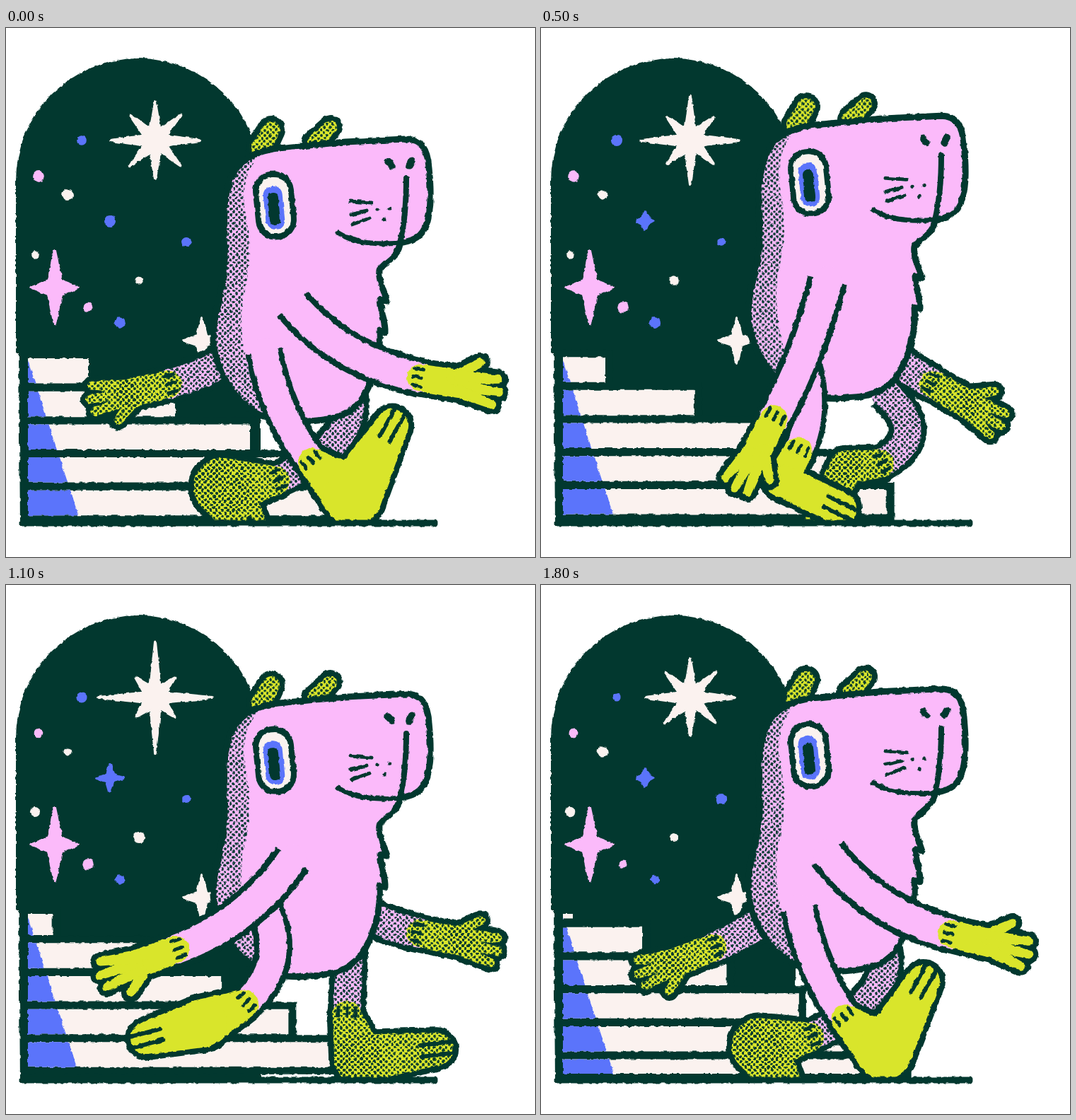
These frames come from a looping animation (748 px wide and 748 px high, 1900 ms). An HTML page with a canvas:

```html
<!DOCTYPE html>
<html lang="en">
<head>
<meta charset="utf-8">
<title>Night walk</title>
<style>
  html, body { margin: 0; width: 100%; height: 100%; overflow: hidden; background: #fff; }
  canvas { display: block; filter: url(#rough); }
  svg { position: absolute; width: 0; height: 0; }
</style>
</head>
<body>
<canvas id="stage" width="748" height="748"></canvas>
<svg><filter id="rough" x="0" y="0" width="100%" height="100%" color-interpolation-filters="sRGB">
  <feTurbulence type="fractalNoise" baseFrequency=".13" numOctaves="2" seed="4"/>
  <feDisplacementMap in="SourceGraphic" scale="4.5" xChannelSelector="R" yChannelSelector="G"/>
</filter></svg>
<script>
const ctx = document.getElementById('stage').getContext('2d');
const DARK = '#02382f', PINK = '#fbbafa', GREEN = '#d9e52b', CREAM = '#fbf2ef', BLUE = '#5b74fb';
const FRAMES = 20, LOOP = 1900, TAU = 2 * Math.PI, DEG = Math.PI / 180;

// Walk settings; the far limbs run half a cycle later and are warped in time
const nearSide = {
  shift: 0, far: false,
  arm: { mean: 92, reach: 62, lead: 0, warp: 0 },
  leg: { hipX: 365, hipY: 457, x: 380, stride: 53, y: 602, drop: 12, lead: 0, warp: 0 }
};
const farSide = {
  shift: FRAMES / 2, far: true,
  arm: { mean: 87, reach: 60, lead: 0, warp: -.5 },
  leg: { hipX: 485, hipY: 515, x: 462, stride: 82, y: 622, drop: -18, lead: .3, warp: .5 }
};
// Key points of one step: frame, knee bend, heel angle, foot pitch
const step = [
  [0, -18, 40, -61], [2, 0, 75, -7], [5, 8, 95, 8], [8, 68, 167, 60], [10, 68, 173, 57],
  [12, 50, 155, 165], [15, 60, 180, 125], [18, 100, 165, 90], [19, -16, 40, -61]
];
const dots = [
  [107, 159, BLUE], [46, 210, PINK], [87, 236, CREAM], [255, 302, BLUE],
  [41, 321, CREAM], [188, 357, CREAM], [116, 395, PINK], [161, 417, BLUE]
];

const arch = new Path2D('M14 216A173 173 0 0 1 360 216V704H20L18 460H14Z');
const body = new Path2D(`M313 225C321 190 345 173 385 168L480 159L565 155C588 155 596 170 598 195
  C601 225 601 245 598 262C593 290 582 298 557 302C556 320 540 325 528 340C526 355 535 370 539 384L529 382
  C530 400 537 415 536 428L528 426C530 455 525 480 512 507C500 535 480 550 440 553C410 557 385 555 358 545
  C322 525 297 485 293 440C292 400 308 370 309 330C309 290 304 260 313 225Z`);
const shade = new Path2D('M378 160C345 182 334 215 337 250C346 300 346 325 338 365C328 410 330 480 376 560H270V160Z');

const tile = document.createElement('canvas');
tile.width = tile.height = 8;
const tileCtx = tile.getContext('2d');
tileCtx.fillStyle = DARK;
for (const p of [2, 6]) { tileCtx.beginPath(); tileCtx.arc(p, p, 1.9, 0, TAU); tileCtx.fill(); }
const halftone = ctx.createPattern(tile, 'repeat');

function swing(frame, lead = 0, warp = 0) {
  const p = frame / FRAMES * TAU + lead;
  return Math.cos(p + warp * Math.sin(p));
}

function keyed(rows, frame) {
  const i = rows.findLastIndex(r => r[0] <= frame);
  const a = rows[i], b = rows[(i + 1) % rows.length];
  const k = (frame - a[0]) / ((b[0] - a[0] + FRAMES) % FRAMES);
  return a.map((v, n) => v + (b[n] - v) * k).slice(1);
}

function circle(x, y, r, color) {
  ctx.fillStyle = color;
  ctx.beginPath();
  ctx.arc(x, y, r, 0, TAU);
  ctx.fill();
}

function line(d, width, color = DARK) {
  ctx.lineWidth = width;
  ctx.strokeStyle = color;
  ctx.stroke(new Path2D(d));
}

function pill(x, y, w, h, r, color, turn = -.1) {
  ctx.save();
  ctx.translate(x, y);
  ctx.rotate(turn);
  ctx.fillStyle = color;
  ctx.beginPath();
  ctx.roundRect(-w / 2, -h / 2, w, h, r);
  ctx.fill();
  ctx.restore();
}

// Spikes of the given lengths, repeated around the centre
function star(x, y, lengths, points, core, color) {
  ctx.beginPath();
  for (let i = 0; i < points * 2; i++) {
    const r = i % 2 ? core : lengths[i / 2 % lengths.length], a = i * Math.PI / points;
    ctx.lineTo(x + r * Math.cos(a), y + r * Math.sin(a));
  }
  ctx.closePath();
  ctx.fillStyle = ctx.strokeStyle = color;
  ctx.lineWidth = 4;
  ctx.fill();
  ctx.stroke();
}

// Tapered capsules, optionally grown for the outline
function blobs(list, grow, color) {
  ctx.fillStyle = color;
  for (const [x1, y1, r1, x2, y2, r2] of list) {
    const a = Math.atan2(y2 - y1, x2 - x1);
    const ratio = (r1 - r2) / (Math.hypot(x2 - x1, y2 - y1) || 1);
    const d = Math.acos(Math.max(-1, Math.min(1, ratio)));
    ctx.beginPath();
    ctx.arc(x1, y1, r1 + grow, a + d, a - d + TAU);
    ctx.arc(x2, y2, r2 + grow, a - d, a + d);
    ctx.fill();
  }
}

function limb([sx, sy, cx, cy, wx, wy], end, width, far) {
  const tube = `M${sx} ${sy}Q${cx} ${cy} ${wx} ${wy}`;
  ctx.lineCap = 'butt';
  line(tube, width + 16);
  blobs(end, 8, DARK);
  ctx.lineCap = 'round';
  line(tube, width, PINK);
  if (far) line(tube, width, halftone);
  blobs(end, 0, GREEN);
  if (far) blobs(end, 0, halftone);
  const a = Math.atan2(wy - cy, wx - cx), ux = Math.cos(a), uy = Math.sin(a);
  for (const o of [-12, 0, 12]) {
    const x = wx - uy * o - ux * 10, y = wy + ux * o - uy * 10;
    line(`M${x} ${y}l${ux * 12} ${uy * 12}`, 5);
  }
}

function drawArm(frame, dy, { shift, far, arm }) {
  const s = swing(frame + shift, arm.lead, arm.warp);
  const turn = (arm.mean - arm.reach * s) * DEG, hand = (arm.mean - arm.reach * 1.34 * s) * DEG;
  const sx = 405, sy = 388 + dy;
  const wx = sx + 209 * Math.cos(turn), wy = sy + 209 * Math.sin(turn);
  const cx = (sx + wx) / 2 - 26 * Math.cos(turn), cy = (sy + wy) / 2 + 33 * Math.abs(Math.cos(turn));
  const dx = 115 * Math.cos(hand), dh = 115 * Math.sin(hand);
  const at = (u, v) => [wx + dx * u - dh * v, wy + dh * u + dx * v];
  const finger = (u, v, tipU, tipV) => [...at(u, v), 9, ...at(tipU, tipV), 6];
  limb([sx, sy, cx, cy, wx, wy], [
    [wx, wy, 19, ...at(.48, 0), 20],
    finger(.4, -.06, .7, -.3),
    finger(.5, -.08, .95, -.13),
    finger(.5, .02, .98, .03),
    finger(.5, .09, .92, .19)
  ], 41, far);
}

function drawLeg(frame, { shift, far, leg }) {
  const phase = (frame + shift) % FRAMES, s = swing(phase), s2 = swing(2 * phase);
  const [bend, heel, pitch] = keyed(step, phase);
  const ax = leg.x + leg.stride * swing(phase, leg.lead, leg.warp), ay = leg.y + leg.drop * s;
  const heelLength = 60 + 15 * s2, heelSize = 31 + 10 * s2, footLength = 97 + 18 * s, toeSize = 23;
  const hx = ax + heelLength * Math.cos(heel * DEG), hy = ay + heelLength * Math.sin(heel * DEG);
  const ux = Math.cos(pitch * DEG), uy = Math.sin(pitch * DEG);
  const tx = hx + footLength * ux, ty = hy + footLength * uy;
  ctx.save();
  ctx.beginPath();
  ctx.rect(0, 0, 748, 698);
  ctx.clip();
  limb([leg.hipX, leg.hipY, (leg.hipX + ax) / 2 + bend, (leg.hipY + ay) / 2 + 10, ax, ay],
    [[ax, ay, 20, hx, hy, heelSize], [hx, hy, heelSize, tx, ty, toeSize]], 38, far);
  for (const o of [-8, 8]) {
    line(`M${tx + ux * toeSize - uy * o} ${ty + uy * toeSize + ux * o}l${-ux * 45} ${-uy * 45}`, 6);
  }
  ctx.restore();
}

function drawSky(phase) {
  ctx.fillStyle = DARK;
  ctx.fill(arch);
  dots.forEach(([x, y, color], i) => circle(x, y, 6.8 + 1.3 * Math.sin(phase / 5 * TAU + i), color));
  const glow = Math.max(0, 1 - Math.abs(phase - 2.1) / 1.6);
  const diagonal = 50 - 12 * glow;
  star(211, 159, [63 + 18 * glow, diagonal, 54 + 26 * glow, diagonal], 8, 17, CREAM);
  const spark = 20 * Math.sin(phase / 5 * Math.PI);
  if (spark) star(147, 273, [spark], 4, 6, BLUE);
  else circle(147, 273, 8, BLUE);
  star(69, 367, [33, 52], 4, 13, PINK);
  star(277, 442, [25, 32], 4, 9, CREAM);
}

// The stairs speed up as they rise by one step and narrow evenly
function drawStairs(phase) {
  const move = phase / 5, steps = [];
  for (let k = 0; k < 6; k++) {
    const y = 467 + 46.7 * (k - move * move), run = k - move;
    const top = Math.max(465, y), bottom = Math.min(691, y + 35.5);
    if (top < bottom) steps.push([top, bottom, Math.max(45, 117 + 132 * run - 9 * run * Math.abs(run))]);
  }
  ctx.fillStyle = DARK;
  for (const [top, bottom, right] of steps) ctx.fillRect(20, top - 10, right - 9, bottom - top + 20);
  for (const [top, bottom, right] of steps) {
    ctx.save();
    ctx.beginPath();
    ctx.rect(31, top, right - 31, bottom - top);
    ctx.clip();
    ctx.fillStyle = CREAM;
    ctx.fillRect(0, 400, 748, 348);
    ctx.fillStyle = BLUE;
    ctx.fill(new Path2D('M31 470L103 691H31Z'));
    ctx.restore();
  }
}

function drawBody() {
  const ears = [[361, 168, 14, 375, 142, 12], [437, 160, 11, 459, 138, 9]];
  blobs(ears, 8, DARK);
  blobs(ears, 0, GREEN);
  blobs(ears, 0, halftone);

  ctx.fillStyle = PINK;
  ctx.fill(body);
  ctx.save();
  ctx.clip(body);
  ctx.fillStyle = halftone;
  ctx.fill(shade);
  ctx.restore();
  ctx.lineWidth = 9;
  ctx.strokeStyle = DARK;
  ctx.stroke(body);

  pill(380, 249, 58, 97, 28, DARK);
  pill(380, 249, 42, 80, 20, CREAM);
  pill(379, 252, 27, 62, 13, BLUE);
  pill(379, 254, 15, 46, 7, DARK);
  pill(543, 190, 18, 10, 5, DARK, .8);
  pill(572, 189, 18, 10, 5, DARK, -1.1);
  line('M566 211Q566 265 557 302', 8);
  line('M470 288Q500 307 557 302', 7);
  line('M487 243L517 245M487 262L510 257M489 276L514 267', 5);
  for (const [x, y] of [[525, 255], [542, 253], [535, 269]]) circle(x, y, 2.6, DARK);
}

function draw(now) {
  const t = now % LOOP;
  const frame = t < 400 ? Math.floor(t / 80) : Math.floor(t / 100) + 1;
  const dy = -13 + 17 * swing(2 * (frame - 1.5)) + 5 * swing(frame);
  ctx.clearRect(0, 0, 748, 748);
  ctx.lineCap = ctx.lineJoin = 'round';
  drawSky(frame % 5);
  drawStairs(frame % 5);
  drawArm(frame, dy, farSide);
  drawLeg(frame, farSide);
  ctx.save();
  ctx.translate(0, dy);
  drawBody();
  ctx.restore();
  drawLeg(frame, nearSide);
  line('M24 700H606', 9);
  drawArm(frame, dy, nearSide);
  requestAnimationFrame(() => draw(performance.now() - start));
}

const start = performance.now();
draw(0);
</script>
</body>
</html>
```
